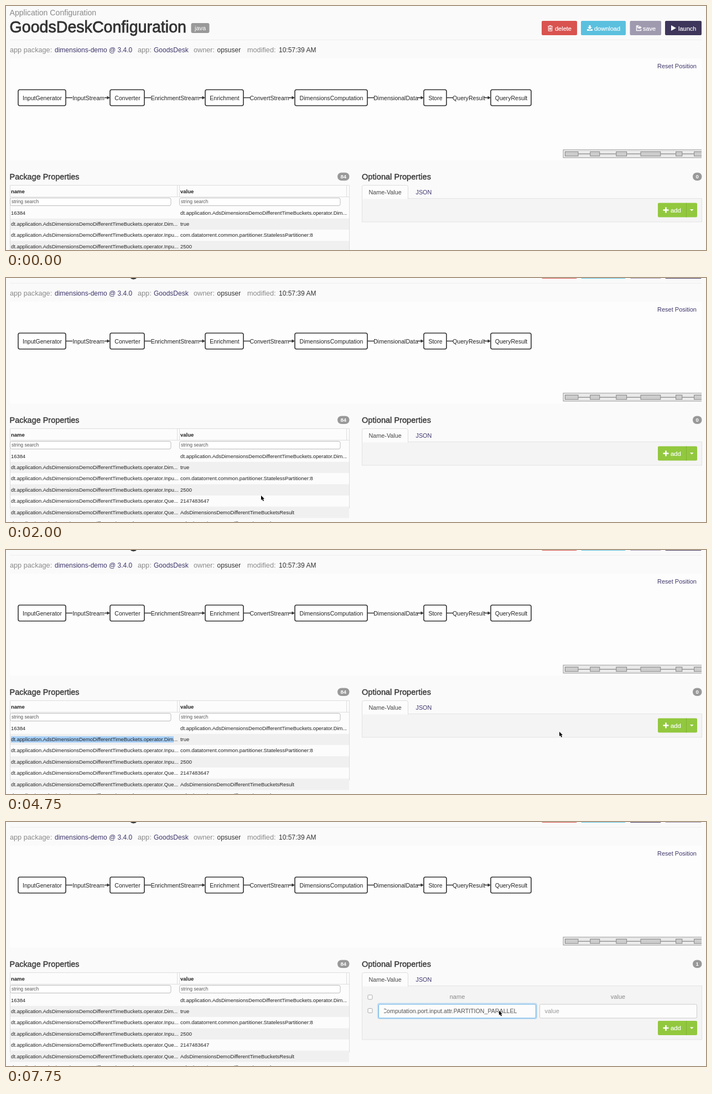
These frames come from a looping animation (1265 by 443 pixels, 8 s). An HTML page:

```html
<!DOCTYPE html>
<html lang="en">
<head>
<meta charset="utf-8">
<title>Application Configuration</title>
<style>
  html, body { margin: 0; width: 100%; height: 100%; overflow: hidden; background: #fafafa; }
  svg { display: block; font-family: "Liberation Sans", Arial, sans-serif; }
</style>
</head>
<body>
<svg id="stage" width="1265" height="443"></svg>
<script>
const LOOP = 8000, STEP = 250;
const INK = '#333', GRAY = '#8a8a8a', LINK = '#40366b', LINE = '#ddd', DARK = '#3f365b', PALE = '#a09aaf';

const text = (x, y, size, fill, str, more = '') =>
  `<text x="${x}" y="${y}" font-size="${size}" fill="${fill}" ${more}>${str}</text>`;
const rect = (x, y, w, h, fill, more = '') =>
  `<rect x="${x}" y="${y}" width="${w}" height="${h}" fill="${fill}" ${more}/>`;
const path = (d, fill, more = '') => `<path d="${d}" fill="${fill}" ${more}/>`;
const line = (d, color, width = 1) => path(d, 'none', `stroke="${color}" stroke-width="${width}"`);
const at = (x, y, body) => `<g transform="translate(${x} ${y})">${body}</g>`;
const middle = 'text-anchor="middle"';
const medium = (color, width) => `stroke="${color}" stroke-width="${width}"`;

// Toolbar icons, each about 10 px wide
const icons = {
  trash: line('M0 2H9M3 2V.5H6V2M1.2 2V10.3H7.8V2M3 4V8.5M4.5 4V8.5M6 4V8.5', '#fff'),
  down: path('M3.5 0H6.5V3.5H9L5 7.5L1 3.5H3.5ZM0 7H2.5L5 9L7.5 7H10V10H0Z', '#fff'),
  save: line('M5 1H1V9.5H9V7M3 1V4H5', '#fff', 1.4) + path('M6 3V1L10.5 4L6 7V5Q4.5 5 3.5 6.5Q3.7 3.2 6 3Z', '#fff'),
  play: path('M0 0L9 5L0 10Z', '#fff')
};

function button(x, w, fill, icon, label, textX) {
  return rect(x, 27, w, 26, fill, 'rx="2"') + at(x + 11, 35, icons[icon]) +
    text(textX, 44.5, 11, '#fff', label, medium('#fff', .2));
}

function badge(x, w, label) {
  return rect(x, 302.5, w, 14.5, '#999', 'rx="7.2"') +
    text(x + w / 2, 313.3, 9.5, '#fff', label, middle + ' font-weight="bold"');
}

function header(saved) {
  const facts = [
    [7, 'app package:', 88, 'dimensions-demo @ 3.4.0', LINK],
    [238, 'app:', 267, 'GoodsDesk', LINK],
    [339, 'owner:', 381.5, 'opsuser', INK],
    [436, 'modified:', 493, '10:57:39 AM', INK]
  ];
  return text(6.5, 17, 14.1, GRAY, 'Application Configuration') +
    text(6.5, 47.5, 28.6, INK, 'GoodsDeskConfiguration', medium(INK, .8)) +
    rect(334.5, 31, 33, 18, '#999', 'rx="3"') + text(341, 44, 11, '#fff', 'java') +
    button(968, 64, '#d9534f', 'trash', 'delete', 992) +
    button(1039, 81, '#5bc0de', 'down', 'download', 1063) +
    button(1127.5, 56.5, saved ? DARK : PALE, 'save', 'save', 1151) +
    button(1191, 66, saved ? PALE : DARK, 'play', 'launch', 1215) +
    line('M7 61.5H1257', '#eee') +
    facts.map(([x, label, vx, value, color]) =>
      text(x, 84, 12.7, GRAY, label) + text(vx, 84, 12, color, value)).join('');
}

const nodes = [
  ['InputGenerator', 22, 108], ['Converter', 188, 250], ['Enrichment', 360, 429],
  ['DimensionsComputation', 522, 653], ['Store', 755, 796], ['QueryResult', 876, 949]
];
const streams = [
  ['InputStream', 120, 178], ['EnrichmentStream', 262, 349], ['ConvertStream', 441, 511],
  ['DimensionalData', 665, 744], ['QueryResult', 808, 865]
];

function graph() {
  let out = rect(7, 95, 1250, 185, '#fdfdfd') + text(1177, 112.5, 11, LINK, 'Reset Position');
  streams.forEach(([name, a, b], i) => {
    const from = nodes[i][2], to = nodes[i + 1][1];
    out += line(`M${from} 166.5H${a}M${b} 166.5H${to - 3}`, INK, 1.3) +
      path(`M${to} 166.5l-5.5 -3v6z`, INK) +
      text((a + b) / 2, 170.5, 10.6, '#222', name, middle);
  });
  for (const [name, a, b] of nodes)
    out += rect(a, 152, b - a, 29, '#fff', 'rx="3" stroke="#333" stroke-width="1.6"') +
      text((a + b) / 2 + .5, 170.5, 10.55, '#222', name, middle);
  const mini = x => 1010.5 + (x - 22) * .273;
  out += '<g clip-path="url(#panel)">' + rect(1007, 261, 270, 14.5, '#e9e9e9', 'stroke="#999"') +
    line('M1012 268.5H1257', '#777');
  for (const [, a, b] of nodes)
    out += rect(mini(a), 264.5, (b - a) * .273, 8, '#ccc', 'stroke="#888"');
  return out + '</g>';
}

const operator = end => `dt.application.AdsDimensionsDemoDifferentTimeBuckets.operator.${end}...`;
const rows = [
  ['16384', operator('Dim')],
  [operator('Dim'), 'true'],
  [operator('Inpu'), 'com.datatorrent.common.partitioner.StatelessPartitioner:8'],
  [operator('Inpu'), '2500'],
  [operator('Que'), '2147483647'],
  [operator('Que'), 'AdsDimensionsDemoDifferentTimeBucketsResult'],
  [operator('Stor'), 'AdsDimensionsDemoDifferentTimeBucketsQuery']
];

function table(selected) {
  const bold = 'font-weight="bold"', box = 'rx="3" stroke="#bbb"';
  let out = text(6.5, 315, 14.45, INK, 'Package Properties', medium(INK, .35)) + badge(599, 21.5, '84') +
    rect(7, 325.5, 613, 140, '#fcfcfc');
  rows.forEach(([name, value], i) => {
    const y = 365.3 + i * 20.4;
    if (i % 2) out += rect(7, y, 613, 20.4, '#f0f0f0');
    if (i === 1 && selected) out += rect(9, y + 4.6, 294, 11.2, '#a6cff8');
    out += text(9, y + 13.2, 9.38, '#222', name) + text(315, y + 13.2, 9.38, '#222', value);
  });
  return out + line('M7.5 470V325.5H620.5V470M7 346.5H620M309.5 326V346M313.5 326V346M615.5 326V346', LINE) +
    text(9, 340, 9.5, '#222', 'name', bold) + text(315, 340, 9.5, '#222', 'value', bold) +
    rect(7.5, 348.5, 290.5, 14, '#fff', box) + rect(313.5, 348.5, 290.5, 14, '#fff', box) +
    text(10, 358.3, 8.6, '#555', 'string search') + text(316, 358.3, 8.6, '#555', 'string search');
}

function field(x, focused) {
  const glow = focused ? rect(x - 1, 381.5, 287, 27.5, 'none', 'rx="3" stroke="#66afe9" stroke-opacity=".35" stroke-width="2"') : '';
  return glow + rect(x + .5, 383, 284, 25, '#fcfcfc', `rx="2" stroke="${focused ? '#66afe9' : '#ccc'}"`);
}

function addButton(y, hot, focused) {
  return rect(1178, y, 71, 26, '#92c83e', 'rx="2"') +
    (hot ? rect(1178, y, 51, 26, '#73a52c', 'rx="2"') : '') +
    line(`M1229.5 ${y}v26`, '#7fb236') +
    (focused ? rect(1177.5, y - .5, 52, 27, 'none', 'rx="2" stroke="#5ba3e0" stroke-width="1.6"') : '') +
    line(`M1187.5 ${y + 13}h10M1192.5 ${y + 8}v10`, '#fff', 2.6) +
    text(1201, y + 17, 11.3, '#fff', 'add', medium('#fff', .2)) +
    path(`M1236 ${y + 11.5}h6.4l-3.2 3.6z`, '#fff');
}

function optional(s) {
  const tall = s.added;
  let out = text(643, 315, 14.6, INK, 'Optional Properties', medium(INK, .35)) +
    badge(1241, 16.5, tall ? '1' : '0') +
    rect(643.5, 349.5, 614, tall ? 97.5 : 42.5, '#f4f4f4', 'stroke="#e3e3e3"') +
    path('M643.5 350.5V328.5Q643.5 325.5 646.5 325.5H723.5Q726.5 325.5 726.5 328.5V350.5', '#fcfcfc', `stroke="${LINE}"`) +
    text(655.5, 341.8, 10.8, '#444', 'Name-Value') + text(740.5, 341.8, 10.8, LINK, 'JSON');
  if (tall) {
    for (const y of [366, 390.5]) out += rect(654, y, 8, 8, '#fbfbfb', 'rx="1.5" stroke="#aaa"');
    out += text(815.5, 373.3, 11, GRAY, 'name', middle) + text(1106, 373.3, 11, GRAY, 'value', middle) +
      field(673, s.focused) + field(964, false) + text(973.5, 399, 11, '#999', 'value');
    out += s.pasted
      ? '<g clip-path="url(#entry)">' + text(923.5, 399, 10.65, '#555',
        'dt.operator.DimensionsComputation.port.input.attr.PARTITION_PARALLEL', 'text-anchor="end"') + '</g>'
      : text(683, 399, 11, '#999', 'name');
    if (s.caret) out += line(`M${s.pasted ? 924.5 : 683.5} 389v12`, '#444');
  }
  return out + addButton(tall ? 413 : 357.5, s.hot, s.added && s.hot);
}

// Pointer stops: time, x, y
const stops = [
  [750, 945, 30], [1000, 695, 261], [1250, 667, 268], [1500, 500, 384], [1750, 478, 395],
  [2000, 461, 395], [2250, 390, 376], [2500, 298, 351], [2750, 271.5, 347],
  [4250, 390, 343], [4500, 700, 336], [4750, 1000, 330], [5000, 1188, 325], [5250, 1196.5, 324],
  [5750, 1100, 331], [6000, 945, 340], [6250, 891, 342.5]
];

function pointer(t) {
  const stop = stops.filter(p => p[0] <= t).pop();
  return stop ? at(stop[1], stop[2],
    path('M0 0V8.2L1.9 6.5L3.4 10L5 9.3L3.5 5.9H6Z', '#000', 'stroke="#fff" stroke-width=".8" paint-order="stroke"')) : '';
}

const defs = '<defs><clipPath id="panel">' + rect(7, 95, 1250, 185, '#000') +
  '</clipPath><clipPath id="entry">' + rect(683, 384, 266, 23, '#000') + '</clipPath></defs>';

function scene(t) {
  const state = {
    added: t >= 5500,
    hot: t >= 5000 && t < 6500,
    focused: t >= 6500,
    pasted: t >= 7250,
    caret: t >= 6500 && t < 7750 && !(t >= 7000 && t < 7250)
  };
  const page = header(t >= 7500) + graph() + table(t >= 3250 && t < 6500) + optional(state);
  return defs + at(0, t >= 2000 ? -52 : 0, page) + pointer(t);
}

const stage = document.getElementById('stage');
const start = performance.now();
let shown = -1;
function tick() {
  const t = Math.floor((performance.now() - start) % LOOP / STEP) * STEP;
  if (t !== shown) stage.innerHTML = scene(shown = t);
  requestAnimationFrame(tick);
}
tick();
</script>
</body>
</html>
```
